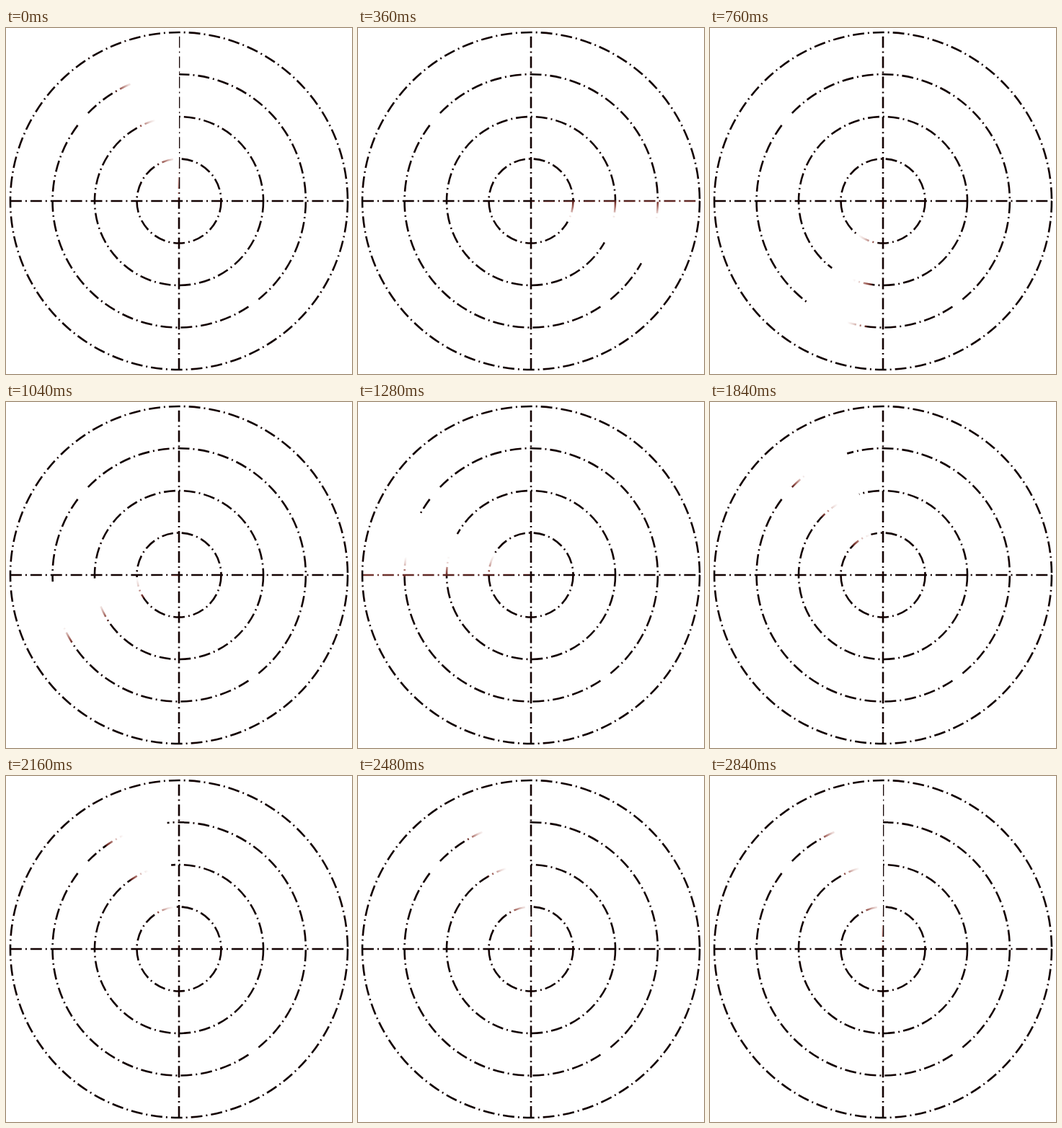
An HTML page without scripts that plays this animation: 480 px wide and 480 px high, repeating every 2880 ms.

```html
<!DOCTYPE html>
<html lang="en">
<head>
<meta charset="utf-8">
<title>Radar sweep</title>
<style>
  @property --tick {
    syntax: "<number>";
    inherits: false;
    initial-value: 0;
  }
  html, body {
    margin: 0;
    width: 100%;
    height: 100%;
    overflow: hidden;
    background: #fff;
  }
  svg {
    display: block;
    width: 100vw;
    height: 100vh;
    background: #fff;
  }
  .line {
    fill: none;
    stroke: #120000;
    stroke-width: 2.6;
    stroke-dasharray: 15.9 5 2 5;
  }

  /* Cubic ease-out turn, held for 40 ms per tick */
  .sweep {
    --left: calc(1 - var(--tick) / 71.6);
    fill: url(#fade);
    mix-blend-mode: screen;
    transform-origin: 0 0;
    transform: rotate(calc(360deg * (1 - var(--left) * var(--left) * var(--left))));
    animation: turn 2880ms steps(72) infinite;
  }
  @keyframes turn {
    from { --tick: 0; }
    to { --tick: 72; }
  }
</style>
</head>
<body>
<svg viewBox="0 0 480 480">
  <defs>
    <!-- Runs at right angles to the trailing edge -->
    <linearGradient id="fade" gradientUnits="userSpaceOnUse" x1="0" y1="0" x2="24.2" y2="-14">
      <stop offset="0" stop-color="#341210"/>
      <stop offset=".2" stop-color="#82463f"/>
      <stop offset=".45" stop-color="#bb908a"/>
      <stop offset=".7" stop-color="#e8d6d3"/>
      <stop offset="1" stop-color="#fff"/>
    </linearGradient>
  </defs>
  <g transform="translate(240 240)">
    <g class="line">
      <circle r="58.5"/>
      <circle r="117"/>
      <!-- The third ring is two open arcs -->
      <path d="M-126.2 -121.9A175.5 175.5 0 1 1 110.4 136.4"/>
      <path d="M96.4 146.7A175.5 175.5 0 0 1 -140.5 -105.1"/>
      <path d="M-234 0H234"/>
      <path d="M0 234V-234"/>
    </g>
    <path class="sweep" d="M0 0L-117 -202.65A234 234 0 0 1 0 -234Z"/>
    <circle class="line" r="234"/>
  </g>
</svg>
</body>
</html>
```
